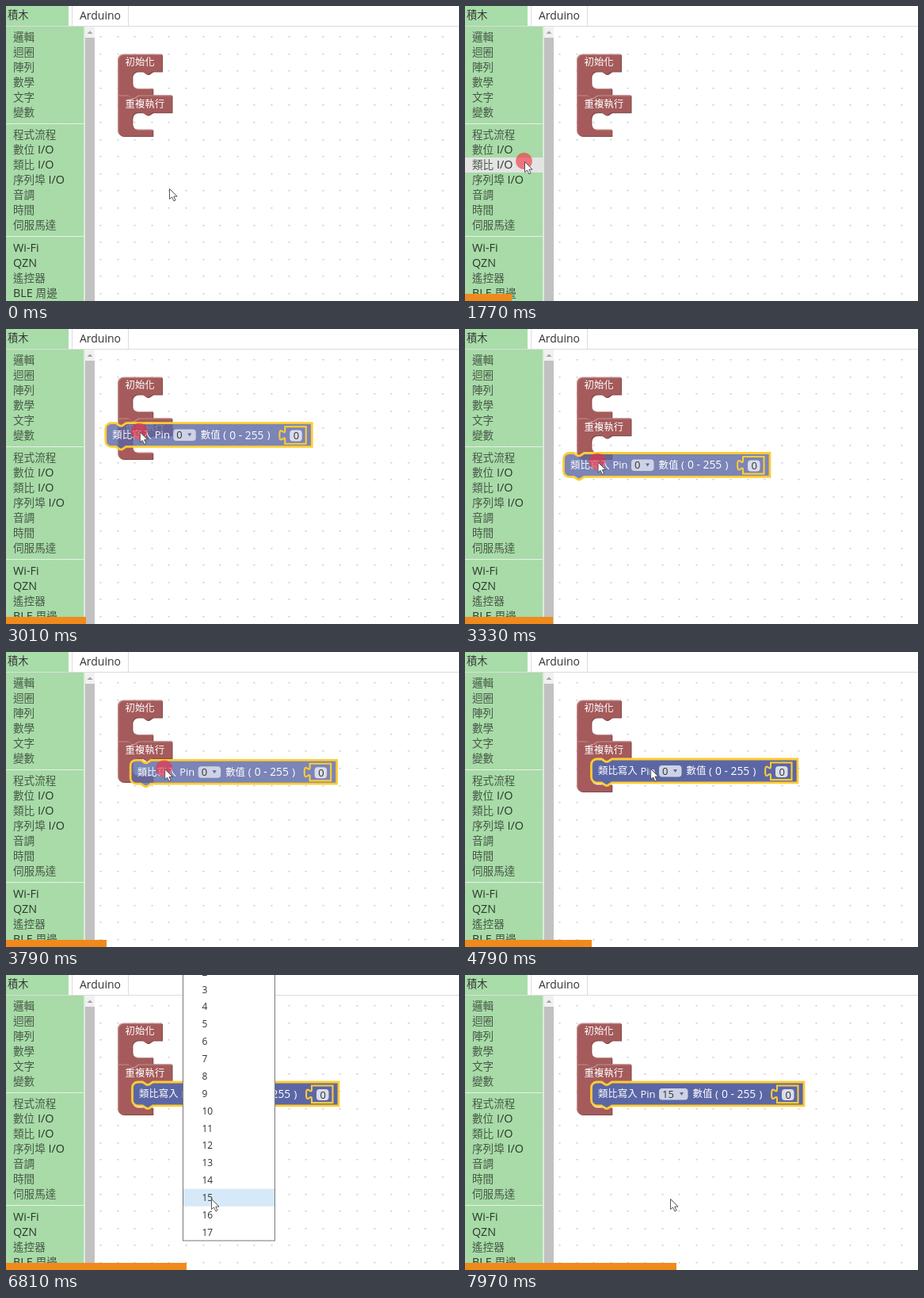
Write an HTML page with a canvas that moves like this. It is 572 px wide and 372 px high and loops after 8000 ms.

```html
<!DOCTYPE html>
<html lang="zh-Hant">
<head>
<meta charset="utf-8">
<title>Block editor</title>
<style>
html, body { margin: 0; width: 100%; height: 100%; overflow: hidden; background: #fff; }
canvas { display: block; }
</style>
</head>
<body>
<canvas id="stage" width="572" height="372"></canvas>
<script>
const ctx = document.getElementById('stage').getContext('2d');
const W = 572, H = 372, LOOP = 8000, STEP = 77.4;
const SCALE = 0.864;
const FAMILY = '"Open Sans","Noto Sans CJK TC","Noto Sans CJK JP","Noto Sans CJK",sans-serif';
const RED = { main: '#a55b5b', dark: '#844949', light: '#c39090' };
const BLUE = { main: '#5b67a5', dark: '#434d84', light: '#8f98c4' };
const YELLOW = '#fc3';

const MENU = [
  [39, ['邏輯', '迴圈', '陣列', '數學', '文字', '變數']],
  [162, ['程式流程', '數位 I/O', '類比 I/O', '序列埠 I/O', '音調', '時間', '伺服馬達']],
  [305, ['Wi-Fi', 'QZN', '遙控器', 'BLE 周邊']]
];
const ROWS = MENU.flatMap(([top, names]) => names.map((name, i) => ({ name, y: top + i * 19 })));

// Pointer stops: time, x, y
const PATH = [
  [0, 206, 230], [310, 206, 230], [850, 156, 228], [1700, 75, 196], [1770, 75, 196],
  [1940, 75, 196], [2390, 144, 113], [2630, 170, 94], [2720, 170, 94], [3330, 167.5, 167.5],
  [3480, 174, 166], [3850, 202, 146], [4330, 202, 146], [4790, 234, 147], [5100, 262, 146],
  [5420, 262, 146], [6130, 254, 143], [6780, 259, 282], [LOOP, 259, 282]
];
const PRESSES = [[1690, 1950], [2690, 3940], [5240, 5400], [6930, 7080]];
const OPEN = 1850, GRAB = 2700, DROP = 3940, LIST = 5330, PICK = 7030;
const GRIP = { x: 43, y: 11 };

const within = (t, a, b) => t >= a && t < b;

function pointer(t) {
  const i = Math.max(1, PATH.findIndex(p => p[0] > t));
  const [t0, x0, y0] = PATH[i - 1], [t1, x1, y1] = PATH[i];
  const u = (t - t0) / (t1 - t0), e = u * u * (3 - 2 * u);
  return { x: x0 + (x1 - x0) * e, y: y0 + (y1 - y0) * e };
}

function rect(x, y, w, h, color) {
  ctx.fillStyle = color;
  ctx.fillRect(x, y, w, h);
}

function round(x, y, w, h, r, color) {
  ctx.fillStyle = color;
  ctx.beginPath();
  ctx.roundRect(x, y, w, h, r);
  ctx.fill();
}

function poly(points, color) {
  ctx.fillStyle = color;
  ctx.beginPath();
  points.forEach(([x, y]) => ctx.lineTo(x, y));
  ctx.closePath();
  ctx.fill();
}

// y is the middle of the line; returns the width
function text(s, x, y, size, color) {
  ctx.font = `${size}px ${FAMILY}`;
  ctx.fillStyle = color;
  ctx.fillText(s, x, y + size * 0.36);
  return ctx.measureText(s).width;
}

// Latin runs are set larger and darker than the Chinese ones
function mixedText(s, x, y, color) {
  for (const run of s.match(/[ -~]+|[^ -~]+/g)) {
    const latin = run < '\x7f';
    x += text(run, x, y, latin ? 14.4 : 13.6, color || (latin ? '#2c382c' : '#465846'));
  }
}

// Block outlines, in unscaled units
const NOTCH = 'l6,4 3,0 6,-4';
const NOTCH_BACK = 'l-6,4 -3,0 -6,-4';
const TAB_UP = 'c0,-10 -8,8 -8,-7.5 s8,2.5 8,-7.5';

const statement = (w, h) =>
  `M0,8 a8,8 0 0 1 8,-8 H15 ${NOTCH} H${w} V${h} H30 ${NOTCH_BACK} H8 a8,8 0 0 1 -8,-8 z`;
const output = (w, h) => `M0,0 H${w} V${h} H0 V20 ${TAB_UP} z`;
const mouth = (w, gap, arm) =>
  `H${w} V25 H51 ${NOTCH_BACK} h-7 a8,8 0 0 0 -8,8 v${gap - 16} a8,8 0 0 0 8,8 H51 v${arm}`;
const setupShape = `M0,8 a8,8 0 0 1 8,-8 ${mouth(64.5, 25, 10)} H30 ${NOTCH_BACK} H0 z`;
const loopShape = (gap, arm) => `M0,0 H15 ${NOTCH} ${mouth(79, gap, arm)} H8 a8,8 0 0 1 -8,-8 z`;

function block(d, x, y, tone, selected, alpha = 1) {
  const shape = new Path2D(d);
  ctx.save();
  ctx.translate(x, y);
  ctx.scale(SCALE, SCALE);
  ctx.globalAlpha = alpha;
  if (!selected) {
    ctx.save();
    ctx.translate(1.2, 1.2);
    ctx.fillStyle = tone.dark;
    ctx.fill(shape);
    ctx.restore();
  }
  ctx.fillStyle = tone.main;
  ctx.fill(shape);
  ctx.globalAlpha = 1;
  if (selected) {
    ctx.strokeStyle = YELLOW;
    ctx.lineWidth = 3.2;
    ctx.stroke(shape);
  } else {
    const rim = new Path2D('M-50,-50 H900 V300 H-50 z');
    rim.addPath(shape, new DOMMatrix([1, 0, 0, 1, 1.2, 1.2]));
    ctx.clip(shape);
    ctx.fillStyle = tone.light;
    ctx.fill(rim, 'evenodd');
  }
  ctx.restore();
}

function socket(x, y, w, value, selected) {
  const d = output(w / SCALE, 25);
  ctx.save();
  ctx.translate(x, y);
  ctx.scale(SCALE, SCALE);
  ctx.strokeStyle = selected ? YELLOW : BLUE.dark;
  ctx.lineWidth = selected ? 2.4 : 1.6;
  ctx.stroke(new Path2D(d));
  ctx.restore();
  if (!selected) block(d, x + 0.8, y + 0.8, BLUE);
  round(x + 6, y + 4.5, w - 11, 14, 4, '#dadde9');
  text(value, x + (value.length > 1 ? 9.5 : 10.5), y + 11.5, 13, '#333');
}

function dropdown(x, y, w, value) {
  round(x, y - 7, w, 14.5, 4, '#ced2e4');
  text(value, x + 4, y, 13, '#333');
  const a = x + w - 10.5;
  poly([[a, y - 2], [a + 5, y - 2], [a + 2.5, y + 2]], BLUE.main);
}

function label(s, x, y) {
  text(s, x, y, 12.4, '#fff');
  text('Pin', x + 53.5, y, 13, '#fff');
}

function range(x, y) {
  text('數值', x, y, 12.4, '#fff');
  text('(', x + 28.5, y, 13, '#fff');
  text('0 - 255', x + 36.5, y, 13.8, '#fff');
  text(')', x + 84, y, 13, '#fff');
}

function writeBlock(x, y, value, selected, alpha) {
  const grow = (value.length - 1) * 8;
  block(statement((260.5 + grow) / SCALE, 34.5), x, y, BLUE, selected, alpha);
  label('類比寫入', x + 8.5, y + 15);
  dropdown(x + 85.5, y + 15, 28.5 + grow, value);
  range(x + 120 + grow, y + 15);
  socket(x + 226.5 + grow, y + 4.5, 26.5, '0', selected);
}

function program(joined) {
  block(setupShape, 141.2, 60.8, RED);
  text('初始化', 150.5, 71, 12.4, '#fff');
  block(joined ? loopShape(38, 10.5) : loopShape(25, 9.5), 141.2, 112.5, RED);
  text('重複執行', 150.5, 123.2, 12.4, '#fff');
}

function grid() {
  for (let y = 38; y < H; y += 21.6)
    for (let x = 11; x < W; x += 21.6)
      rect(Math.round(x) - 0.5, Math.round(y), 2, 1.5, '#cbcbcb');
}

function header() {
  rect(0, 0, W, 26, '#fff');
  rect(0, 25, W, 1, '#dcdcdc');
  rect(0, 0, 79, 25, '#a8dca9');
  text('積木', 2, 11.5, 13.2, '#333');
  rect(83, 0, 1, 25, '#dcdcdc');
  rect(154, 0, 1, 25, '#dcdcdc');
  text('Arduino', 93, 11.8, 14, '#333');
}

function sidebar(p, open) {
  rect(0, 26, 100, H, 'rgba(156,215,157,.88)');
  rect(98, 26, 2, H, '#dcebdc');
  for (const y of [148, 290]) rect(0, y, 98, 1, '#e8f0e8');
  for (const { name, y } of ROWS) {
    const chosen = open && name === '類比 I/O';
    const hover = p.x < 98 && Math.abs(p.y - y) < 9.5;
    if (chosen || hover) rect(0, y - 9, 98.5, 19, chosen ? '#4caf50' : '#e4e4e4');
    mixedText(name, 9, y, chosen && '#fff');
  }
  rect(100, 26, 12, H, '#f1f1f1');
  poly([[102.5, 35], [106, 31.5], [109.5, 35]], '#a3a3a3');
  rect(100, 40, 12, H, within(p.x, 100, 112) ? '#a8a8a8' : '#c1c1c1');
}

function flyout(p) {
  round(112, 26, 311, H - 26, [0, 8, 8, 0], 'rgba(221,221,221,.82)');
  block(output(128 / SCALE, 25), 127, 40.5, BLUE);
  label('類比讀取', 135, 51);
  dropdown(214, 51, 36, 'A0');
  writeBlock(127, 83.5, '0', p.x > 127 && within(p.y, 84, 115));
  block(output(137 / SCALE, 35), 127, 138.5, BLUE);
  label('類比讀取', 135, 153.5);
  socket(222, 143.5, 35, '14');
  block(statement(272 / SCALE, 35), 127, 190.5, BLUE);
  label('類比寫入', 135, 205.5);
  socket(222, 195, 27, '0');
  range(257, 205.5);
  socket(363, 195, 27, '0');
}

function pinList(p) {
  rect(223, 0, 117, 335.5, '#777');
  rect(224, 0, 115, 334.5, '#fff');
  for (let n = 2; n <= 17; n++) {
    const y = 18.3 + (n - 3) * 21.86;
    if (Math.abs(p.y - y) < 10.93) rect(224, y - 11, 115, 22, '#d6e9f8');
    text(String(n), 247.5, y, 12, '#333');
  }
}

function cursor(p, pressed) {
  if (pressed) {
    ctx.fillStyle = 'rgba(242,45,60,.62)';
    ctx.beginPath();
    ctx.arc(p.x - 0.5, p.y - 0.5, 10.5, 0, 7);
    ctx.fill();
  }
  const arrow = new Path2D('M0,0 V13 L3,10.4 5.4,15.4 7.6,14.4 5.3,9.6 H9.6 z');
  ctx.save();
  ctx.translate(p.x + 0.5, p.y + 0.5);
  ctx.fillStyle = '#fff';
  ctx.fill(arrow);
  ctx.strokeStyle = '#444';
  ctx.lineWidth = 0.9;
  ctx.stroke(arrow);
  ctx.restore();
}

function draw(t) {
  const step = Math.floor((t + 12) / STEP);
  const now = step * STEP;
  const p = pointer(Math.min(now, LOOP - 1));
  const open = within(now, OPEN, GRAB);

  rect(0, 0, W, H, '#fff');
  grid();
  program(now >= DROP);
  if (open) flyout(p);
  if (within(now, GRAB, DROP)) writeBlock(p.x - GRIP.x, p.y - GRIP.y, '0', true, 0.8);
  if (now >= DROP) writeBlock(159.5, 135, now < PICK ? '0' : '15', true);
  sidebar(p, open);
  header();
  if (within(now, LIST, PICK)) pinList(p);
  cursor(p, PRESSES.some(([a, b]) => within(now, a, b)));
  rect(0, 363, Math.floor(step * 2.593), 9, '#f08a1c');
}

const start = performance.now();
function tick() {
  draw((performance.now() - start) % LOOP);
  requestAnimationFrame(tick);
}
tick();
</script>
</body>
</html>
```
